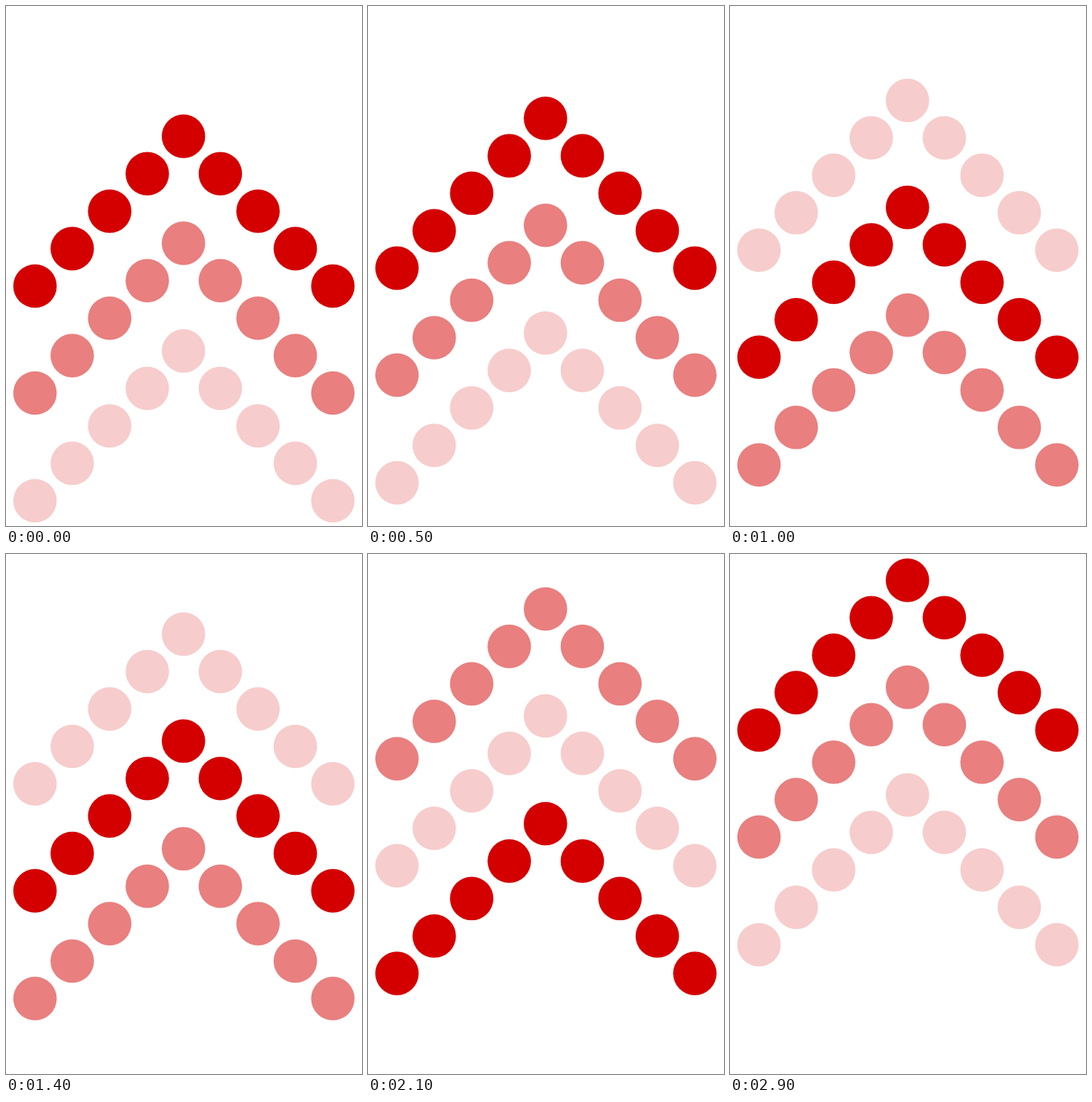
Write an HTML page with a canvas that moves like this. It is 480 px wide and 700 px high and loops after 3 s.

```html
<!DOCTYPE html>
<html lang="en">
<head>
<meta charset="utf-8">
<title>Rising chevrons</title>
<style>
  html, body { margin: 0; width: 100%; height: 100%; overflow: hidden; background: #fff; }
  canvas { display: block; }
</style>
</head>
<body>
<canvas id="stage" width="480" height="700"></canvas>
<script>
const ctx = document.getElementById('stage').getContext('2d');
const STEP = 100, STEPS = 30, RADIUS = 29.3;
const COLUMNS = [39.1, 89.3, 139.8, 190.5, 239.3, 289, 339.8, 390.1, 440.7];
const ROWS = [0, 144, 289];
const LEVELS = [1, 0.2, 0.5];

// Each level holds for five steps, then fades to the next over five.
function opacity(row, step) {
  const phase = Math.floor(step / 10);
  const fadeLength = phase === 2 ? 4 : 5;
  const fade = Math.min(1, Math.max(0, (step % 10 - 5) / fadeLength));
  const level = n => LEVELS[(n - row + 3) % 3];
  const from = level(phase), to = level(phase + 1);
  return from + (to - from) * fade;
}

function draw(step) {
  ctx.globalAlpha = 1;
  ctx.clearRect(0, 0, 480, 700);
  ctx.fillStyle = '#d40000';
  const top = 175.4 - 140 * step / (STEPS - 1);
  ROWS.forEach((offset, row) => {
    ctx.globalAlpha = opacity(row, step);
    COLUMNS.forEach((x, i) => {
      ctx.beginPath();
      ctx.arc(x, top + offset + Math.abs(i - 4) * 50.4, RADIUS, 0, 2 * Math.PI);
      ctx.fill();
    });
  });
}

function tick() {
  draw(Math.floor(performance.now() / STEP) % STEPS);
  requestAnimationFrame(tick);
}
tick();
</script>
</body>
</html>
```
